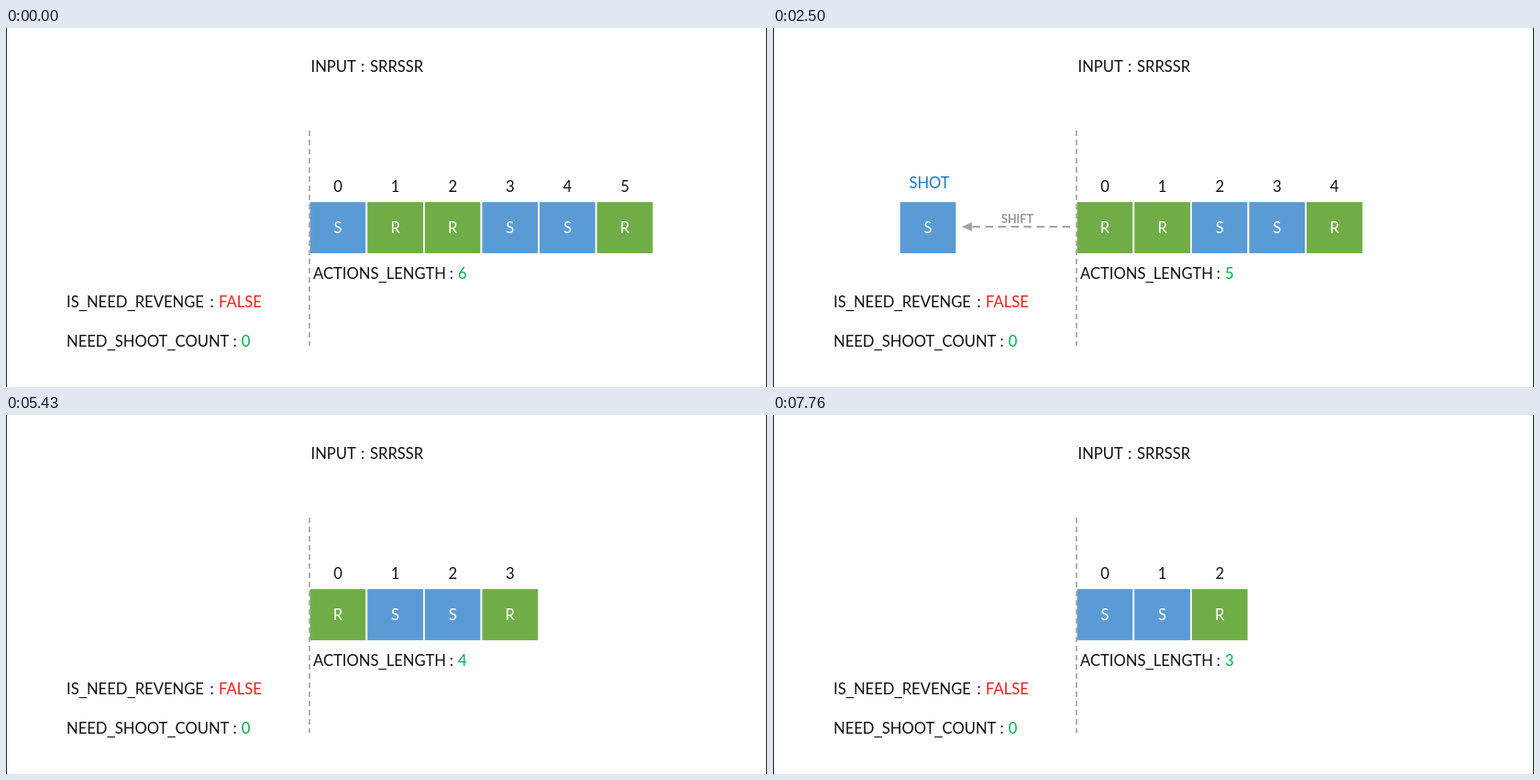
Recreate the animation shown at these times as an HTML page. Size 830 by 392 pixels, loop 8000 ms.

```html
<!DOCTYPE html>
<html lang="en">
<head>
<meta charset="utf-8">
<title>Action queue</title>
<style>
  html, body { margin: 0; width: 100%; height: 100%; overflow: hidden; background: #fefefe; }
  svg { display: block; width: 830px; height: 392px; font: 16.6px Lato, Carlito, sans-serif; }
  .low { font-family: "DejaVu Sans", sans-serif; }
</style>
</head>
<body>
<svg id="stage" viewBox="0 0 830 392"></svg>
<script>
const stage = document.getElementById('stage');
const INPUT = 'SRRSSR', LOOP = 8000, LEFT = 330.7, PITCH = 62.6;
const BLUE = '#5b9bd5', GREEN = '#70ad47', VALUE = '#00b050', GRAY = '#a6a6a6';

// start time, actions shifted so far, shifted action on show, shots owed
const steps = [
  [0, 0, false, 0],
  [1460, 1, true, 0],
  [2800, 1, false, 1],
  [3860, 2, true, 1],
  [5030, 2, false, 0],
  [6230, 3, true, 0],
  [7530, 3, false, 0]
];

const text = (s, x, y, fill = '#111', extra = '') =>
  `<text x="${x}" y="${y}" fill="${fill}" ${extra}>${s}</text>`;

const centered = (s, x, y, fill) => text(s, x, y, fill, 'text-anchor="middle"');

// underscores use a font with a wider one
const field = (name, x, colonX, valueX, y, value, fill) =>
  text(name.replaceAll('_', '<tspan class="low">_</tspan>'), x, y) +
  text(':', colonX, y) + text(value, valueX, y, fill);

const cell = (action, x) =>
  `<rect x="${x}" y="189.2" width="${PITCH}" height="57.6" fill="${action === 'S' ? BLUE : GREEN}" stroke="#fefefe" stroke-width="1.8"/>` +
  centered(action, x + PITCH / 2, 224, '#fff');

const dashed = (path, dash, width) =>
  `<path d="${path}" fill="none" stroke="${GRAY}" stroke-width="${width}" stroke-dasharray="${dash}"/>`;

function shifted(action) {
  const shot = action === 'S';
  return centered(shot ? 'SHOT' : 'REVENGE', 170.5, 175, shot ? '#1c7ac8' : '#5a9440') +
    cell(action, 169 - PITCH / 2) +
    dashed('M324 217H216', '8.5 5.5', 2) +
    `<path d="M206 217l11-5v10z" fill="${GRAY}"/>` +
    text('SHIFT', 249, 213, '#989898', 'font-size="12.6" font-weight="700"');
}

function scene([, count, showing, owed]) {
  const queue = [...INPUT].slice(count);
  return '<path d="M.5 0V392M829.5 0V392" stroke="#222"/>' +
    field('INPUT', 332.5, 387, 397, 48, INPUT) +
    queue.map((action, i) => {
      const x = LEFT + i * PITCH;
      return cell(action, x) + centered(i, x + PITCH / 2, 179);
    }).join('') +
    dashed('M331 112V347', '6 4', 1.7) +
    field('ACTIONS_LENGTH', 335, 483.8, 493, 274, queue.length, VALUE) +
    field('IS_NEED_REVENGE', 66, 222.5, 232, 305, owed ? 'TRUE' : 'FALSE', owed ? VALUE : '#f51d1d') +
    field('NEED_SHOOT_COUNT', 66, 247.5, 256.8, 348, owed, VALUE) +
    (showing ? shifted(INPUT[count - 1]) : '');
}

let current;
const start = performance.now();
function frame(now) {
  const t = Math.max(0, now - start) % LOOP;
  const step = steps.findLast(s => s[0] <= t);
  if (step !== current) stage.innerHTML = scene(current = step);
  requestAnimationFrame(frame);
}
frame(start);
</script>
</body>
</html>
```
